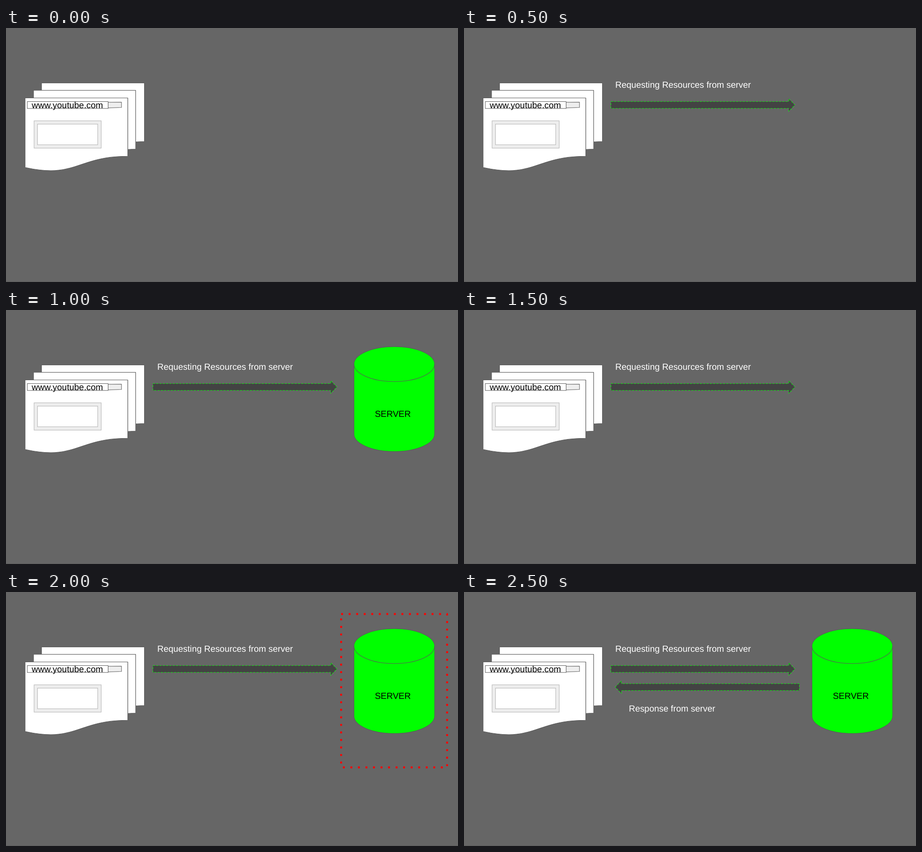
Write an HTML page that moves like this. It is 998x561 px and loops after 3000 ms.

```html
<!DOCTYPE html>
<html lang="en">
<head>
<meta charset="utf-8">
<title>Client and server</title>
<style>
  html, body { margin: 0; width: 100%; height: 100%; overflow: hidden; background: #666; }
  svg { display: block; width: 998px; height: 561px; }
  text { font: 19.4px "Liberation Sans", Arial, sans-serif; text-rendering: geometricPrecision; }
  .line { stroke: #595959; stroke-width: 1.04; stroke-linejoin: round; }
  .page { fill: #fff; }
  .grey { fill: #eee; }
  .soft { stroke: #b2b2b2; stroke-width: 1.04; }
  .arrow { fill: #434343; stroke: #0f0; stroke-width: 1.04; stroke-dasharray: 4.16 3.12; stroke-linejoin: round; }
  .server { fill: #0f0; }
  .dots { fill: none; stroke: #f00; stroke-width: 4.16; stroke-dasharray: 4.16 12.48; stroke-linejoin: round; }
  .note { fill: #fff; }
  #request, #server, #alert, #response { opacity: 0; }
</style>
</head>
<body>
<svg viewBox="0 0 998 561">
  <rect width="998" height="561" fill="#666"/>
  <rect y="560" width="998" height="1" fill="#5a5a5a"/>

  <g id="browser">
    <path class="page line" d="M78.5 137.8V121.6H305.5V250.7C295.8 250.7 286.2 251.4 286.2 251.4V137.8Z"/>
    <path class="page line" d="M60.9 154.5V137.8H286.2V267.4C277.5 267.4 268.8 268.3 268.8 268.3V154.5Z"/>
    <path class="page line" d="M42.2 308.1C155.5 332.9 155.5 283.3 268.8 283.3V154.5H42.2Z"/>
    <path class="grey line" d="M225.5 164L255 163.8V175.6L225.5 176.5Z"/>
    <rect class="page line" x="47" y="162.5" width="178.5" height="15.2"/>
    <text x="56.8" y="177.4">www.youtube.com</text>
    <rect class="grey soft" x="62" y="205" width="148.2" height="60.3"/>
    <rect class="page soft" x="69.5" y="212.3" width="133" height="45.6"/>
  </g>

  <g id="request">
    <text class="note" x="333.9" y="132.4">Requesting Resources from server</text>
    <path class="arrow" d="M324.5 162.5H717V155.9L730.5 170L717 184.1V177.6H324.5Z"/>
  </g>

  <g id="server">
    <path class="server line" d="M768.3 119.5A89 38.4 0 0 1 946.3 119.5V274A89 38.4 0 0 1 768.3 274Z"/>
    <path class="line" fill="none" d="M768.3 119.5A89 38.4 0 0 0 946.3 119.5"/>
    <text x="814.4" y="236.4">SERVER</text>
  </g>

  <path id="alert" class="dots" d="M740 48.7H974V387.4H740Z"/>

  <g id="response">
    <path class="arrow" d="M334 210L347.5 195.9V202.5H740.5V217.6H347.5V224.1Z"/>
    <text class="note" x="363.9" y="263.8">Response from server</text>
  </g>
</svg>
<script>
  // One digit per 500 ms step: 1 shows the part, 0 hides it.
  const steps = {
    request:  "011111",
    server:   "001011",
    alert:    "000010",
    response: "000001"
  };

  for (const [id, row] of Object.entries(steps)) {
    const frames = [...row].map((on, i) => ({
      opacity: +on, offset: i / row.length, easing: "step-end"
    }));
    frames.push({ opacity: +row.at(-1), offset: 1 });
    document.getElementById(id).animate(frames, {
      duration: 500 * row.length, iterations: Infinity
    }).startTime = 0;
  }
</script>
</body>
</html>
```
